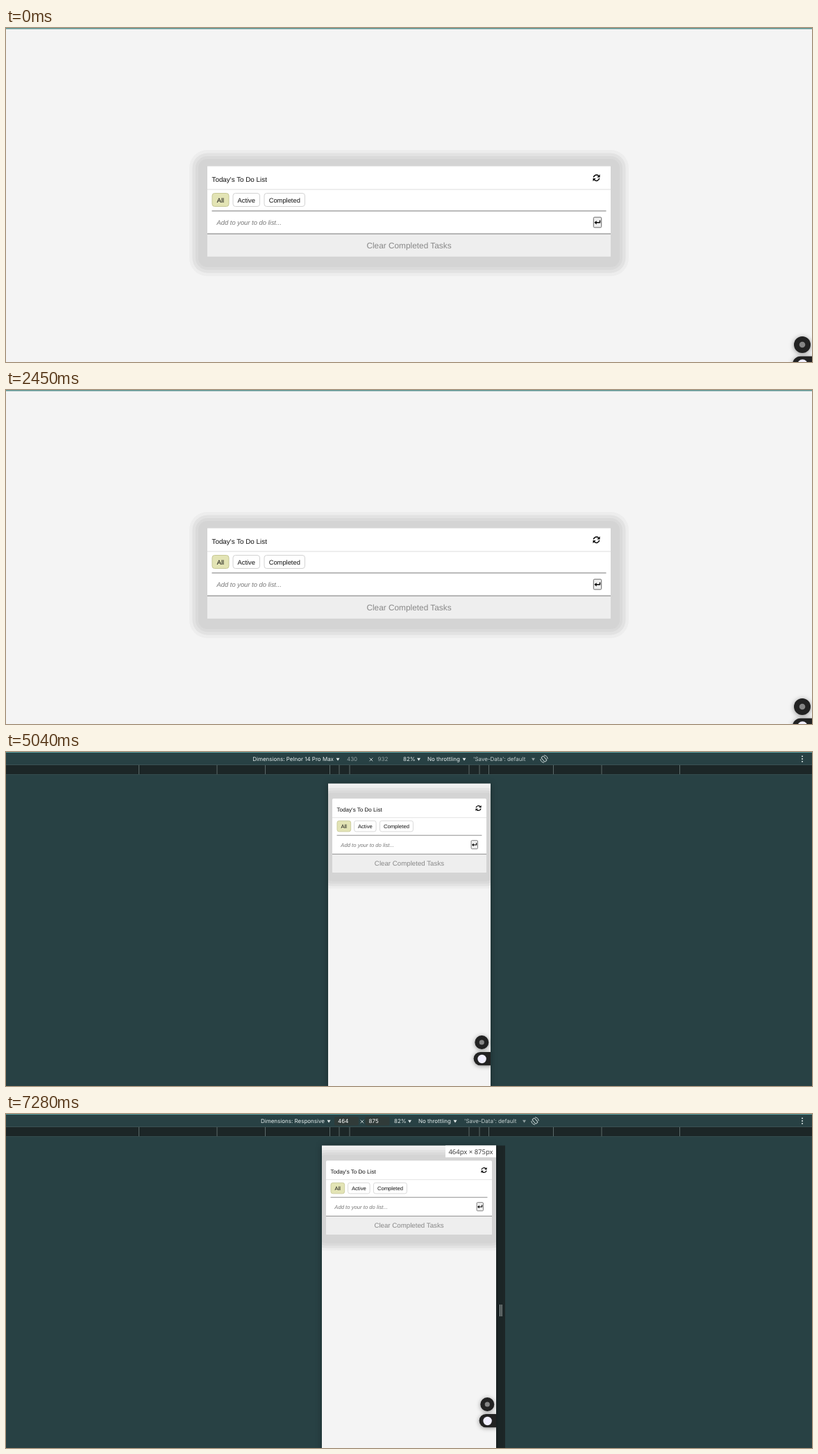
Recreate the animation shown at these times as an HTML page. Size 1161 by 482 pixels, loop 8 s.

```html
<!DOCTYPE html>
<html lang="en">
<head>
<meta charset="utf-8">
<title>To do list in device view</title>
<style>
  html, body { margin: 0; width: 100%; height: 100%; overflow: hidden; background: #f4f4f4; }
  #stage { display: block; width: 1161px; height: 482px; }
  text { font-family: Inter, "Open Sans", sans-serif; text-rendering: geometricPrecision; white-space: pre; }
  .card text { font-family: "Liberation Sans", Arial, sans-serif; }
  .menu text { font-size: 8.35px; font-weight: 500; }
  .menu { filter: drop-shadow(0 4px 6px #0005); }
  .fab { filter: drop-shadow(0 1px 3px #0006); }
  .device { filter: drop-shadow(0 0 4px #0005); }
</style>
</head>
<body>
<svg id="stage" viewBox="0 0 1161 482"></svg>
<script>
const rect = (x, y, w, h, fill, more = '') =>
  `<rect x="${x}" y="${y}" width="${w}" height="${h}" fill="${fill}" ${more}/>`;
const text = (x, y, s, size, fill, more = '') =>
  `<text x="${x}" y="${y}" font-size="${size}" fill="${fill}" ${more}>${s}</text>`;
const path = (d, more = '') => `<path d="${d}" ${more}/>`;
const group = (x, y, content, k = 1, more = '') =>
  `<g transform="translate(${x} ${y}) scale(${k})" ${more}>${content}</g>`;
const layer = (id, content, more = '') => `<g id="${id}" ${more}>${content}</g>`;
const END = 'text-anchor="end"', MID = 'text-anchor="middle"';

// To do card; the last two values are icon distances from its right edge
function card(x, y, width, k, inset, refreshRight, enterRight) {
  const w = width / k;
  const shadow = [[26, '#ededed'], [21.5, '#e2e2e2'], [17, '#dadada'], [13, '#d4d4d4']]
    .map(([e, c]) => rect(-e, 2.5 - e, w + 2 * e, 130 + 2 * e, c, `rx="${e}"`)).join('');
  const button = (dx, bw, label, fill, stroke) =>
    rect(inset + dx + .5, 39, bw - 1, 19, fill, `rx="3.5" stroke="${stroke}"`) +
    text(inset + dx + bw / 2, 52.2, label, 9.35, '#111', MID);
  const half = path('M-4.2-.7A4.3 4.3 0 0 1 3-3', 'fill="none" stroke="#000" stroke-width="1.5"') +
    path('M5-5V-.8H.8z');
  const refresh = half + `<g transform="rotate(180)">${half}</g>`;
  const enter = rect(-5.7, -7.4, 11.4, 14.8, '#efefef', 'rx="1.5" stroke="#666"') +
    path('M3.5-3V.3H-3', 'fill="none" stroke="#000" stroke-width="1.4"') + path('M-4.6.3L-1.4-2.5V3.1z');
  return group(x, y, shadow +
    rect(0, 0, w, 130, '#fff', k < 1 ? 'rx="2"' : '') +
    text(inset, 22.7, "Today's To Do List", 9.85, '#111') +
    rect(0, 33, w, 1, '#ddd') +
    button(0, 25, 'All', '#e3e4b5', '#c6c795') +
    button(30, 39.5, 'Active', '#fff', '#d2d2d2') +
    button(75, 59.5, 'Completed', '#fff', '#d2d2d2') +
    rect(inset, 64, w - 2 * inset, 1, '#777') +
    text(inset + 7, 84.5, 'Add to your to do list...', 9.4, '#777', 'font-style="italic"') +
    rect(0, 97.5, w, 32.5, '#eee') + rect(0, 97, w, 1, '#777') +
    text(w / 2, 118.3, 'Clear Completed Tasks', 11.85, '#888', MID) +
    group(w - refreshRight, 16.7, refresh) +
    group(w - enterRight, 81, enter), k, 'class="card"');
}

const fab = (x, y, k) => group(x, y,
  path('M14 14H-2A9.7 9.7 0 0 0-2 33.4H14z'.replace(/33.4/, '33.4'), 'transform="translate(0 -.1)" fill="#222"') +
  '<circle cx=".3" cy="24" r="6.2" fill="#f1efff"/>' +
  '<circle r="10" fill="#222"/><circle r="3.6" fill="#858585"/>', k, 'class="fab"');

// Clipped phone screen
const device = (x, w, content) =>
  `<g class="device">${rect(x, 45.5, w, 440, '#f4f4f4')}</g>
   <svg x="${x}" y="45.5" width="${w}" height="437">${content}</svg>`;
const phone = w => card(6, 21.8, w - 12, .82, 8, 14, 21);
const phoneFab = w => fab(w - 12.7, 373.5, 1);

const arrow = (x, c = '#dfe8e8') => path(`M${x - 2.5} 8.8h5l-2.5 4z`, `fill="${c}"`);
function toolbar(name, shift) {
  const live = shift < 0;
  const value = (x, s) => (live ? rect(x - 5, 4, 35, 12.5, '#303b39', 'rx="2"') : '') +
    text(x, 13, s, 8, live ? '#fff' : '#93a2a3');
  return text(472 + shift, 13, 'Dimensions: ' + name, 8, '#e6eeee', END) +
    group(shift, 0, arrow(478) + value(491, live ? 464 : 430) +
      path('M523.6 8.6l4.6 4.6m0-4.6l-4.6 4.6', 'stroke="#c5d0d0"') +
      value(535.5, live ? 875 : 932) +
      text(572, 13, '82%', 8, '#e6eeee') + arrow(594.5) +
      text(607, 13, 'No throttling', 8, '#e6eeee') + arrow(660) +
      text(673, 13, "'Save-Data': default", 8, '#c3cfcf') + arrow(759.5, '#8fa0a1') +
      group(775, 10, rect(-2, -4, 4, 8, 'none', 'rx=".8" transform="rotate(-40)"') +
        path('M0-5.2A5.2 5.2 0 0 1 5.2 0M0 5.2A5.2 5.2 0 0 1-5.2 0', 'fill="none"'), 1, 'stroke="#c3cfcf"'));
}

// Menu rows: '-' is a separator, a leading '~' is disabled
function menuRows(x, y, right, rows) {
  return rows.map(row => {
    if (row === '-') {
      y += 7.15;
      return rect(x.line, y - 11, right - x.line, 1, '#666');
    }
    const off = row[0] === '~';
    const line = text(x.text, y + 3, off ? row.slice(1) : row, 8.35, off ? '#8b8b8b' : '#fff');
    y += 14.55;
    return line;
  }).join('');
}

const contextMenu =
  rect(806, 293.5, 210, 210, '#161616', 'fill-opacity=".83" rx="4" stroke="#777"') +
  rect(805.2, 292.7, 211.6, 212, 'none', 'rx="4.5" stroke="#222" stroke-width=".6"') +
  menuRows({ text: 814, line: 814 }, 304.7, 1007, ['~Back', '~Forward', 'Reload', '-', 'Save As...', 'Print...',
    'Cast...', 'Search with Quibra Scan', 'Open in reading mode', '-', 'Send to Your Devices',
    'Create QR code for this page', '-', 'Translate to English']);

const deviceMenu =
  rect(486, 13.5, 130, 295.5, '#121212', 'rx="4" stroke="#777"') +
  rect(485.2, 12.7, 131.6, 297.1, 'none', 'rx="4.5" stroke="#111" stroke-width=".6"') +
  layer('pick', rect(488, 16, 126, 14.5, '#1070d6', 'rx="2.5"')) +
  menuRows({ text: 500.5, line: 494 }, 23.4, 608, ['Responsive', '-', 'Pelnor LE', 'Pelnor VK', 'Pelnor 12 Pro',
    'Pelnor 14 Pro Max', 'Drilk 7', 'Bralvon Meadow T8+', 'Bralvon Meadow T20 Plus', 'Tavu Mini', 'Tavu Air',
    'Tavu Pro', 'Terrace Pro 7', 'Terrace Duo', 'Meadow Q Flex 5', 'Orlu Calmpad Flex', 'Bralvon Meadow B51/71',
    'Burr Orb', 'Burr Orb Max', '-', 'Edit...']) +
  path('M492 89l1.8 2.4 3.6-5', 'fill="none" stroke="#fff" stroke-width="1.2"');

const ticks = [389.5, 277, 207.5, 114.5, 101, 86]
  .map(d => rect(580.5 - d, 19, 1, 13, '#5c6b6b') + rect(580.5 + d, 19, 1, 13, '#5c6b6b')).join('');

const stage = document.getElementById('stage');
stage.innerHTML =
  layer('desktop', rect(0, 0, 1161, 482, '#f4f4f4') + rect(0, 0, 1161, 1.6, '#5f9593') +
    card(290, 199.5, 581, 1, 6.5, 20.5, 19) + fab(1147, 457, 1.2)) +
  layer('context', contextMenu, 'class="menu"') +
  layer('tools', rect(0, 0, 1161, 482, '#284144') + rect(0, 0, 1161, 1, '#5aa0a0') +
    rect(0, 18.5, 1161, 13.5, '#1c2627') + rect(0, 18, 1161, 1, '#3a5153') + rect(0, 32, 1161, 1, '#344c4e') + ticks +
    [6.2, 10, 13.8].map(y => `<circle cx="1147" cy="${y}" r="1" fill="#dfe8e8"/>`).join('') +
    layer('hover', rect(352, 3, 132, 13.5, '#35504f', 'rx="2"')) +
    layer('fixed', toolbar('Pelnor 14 Pro Max', 0) +
      device(464, 234, layer('first', card(6, 26.3, 222, 1, 8, 14, 21)) +
        layer('small', phone(234)) + layer('float', phoneFab(234)))) +
    layer('fluid', toolbar('Responsive', -13) + rect(706, 45.5, 13, 437, '#1c2627') +
      rect(711, 275, 1, 17, '#b5bcbc') + rect(713.5, 275, 1, 17, '#b5bcbc') +
      device(455, 251, phone(251) + phoneFab(251)) + rect(633, 45.5, 73, 17, '#fff') +
      text(669.5, 57.7, '464px × 875px', 9.5, '#333', MID + ' style="font-family:\'Open Sans\',sans-serif"'))) +
  layer('devices', deviceMenu, 'class="menu"');

const parts = Object.fromEntries([...stage.querySelectorAll('[id]')].map(el => [el.id, el]));
const show = (id, amount) => {
  parts[id].style.opacity = +amount;
  parts[id].style.display = amount ? '' : 'none';
};
const within = (t, from, to) => t >= from && t < to;
// Menus close in 70 ms steps
const menuFade = (t, open, close) =>
  t < open ? 0 : t < close ? 1 : [.6, .25][Math.floor((t - close) / 70)] || 0;

function draw() {
  const t = performance.now() % 8000;
  show('desktop', t < 2730);
  show('context', menuFade(t, 840, 2310));
  show('tools', t >= 2730);
  show('first', t < 4060);
  show('float', t >= 4060);
  show('small', t >= 5040);
  show('hover', within(t, 5460, 5810));
  show('devices', menuFade(t, 5950, 7000));
  show('pick', t >= 6510 && !within(t, 6860, 6930));
  show('fixed', t < 7210);
  show('fluid', t >= 7210);
  requestAnimationFrame(draw);
}
draw();
</script>
</body>
</html>
```
